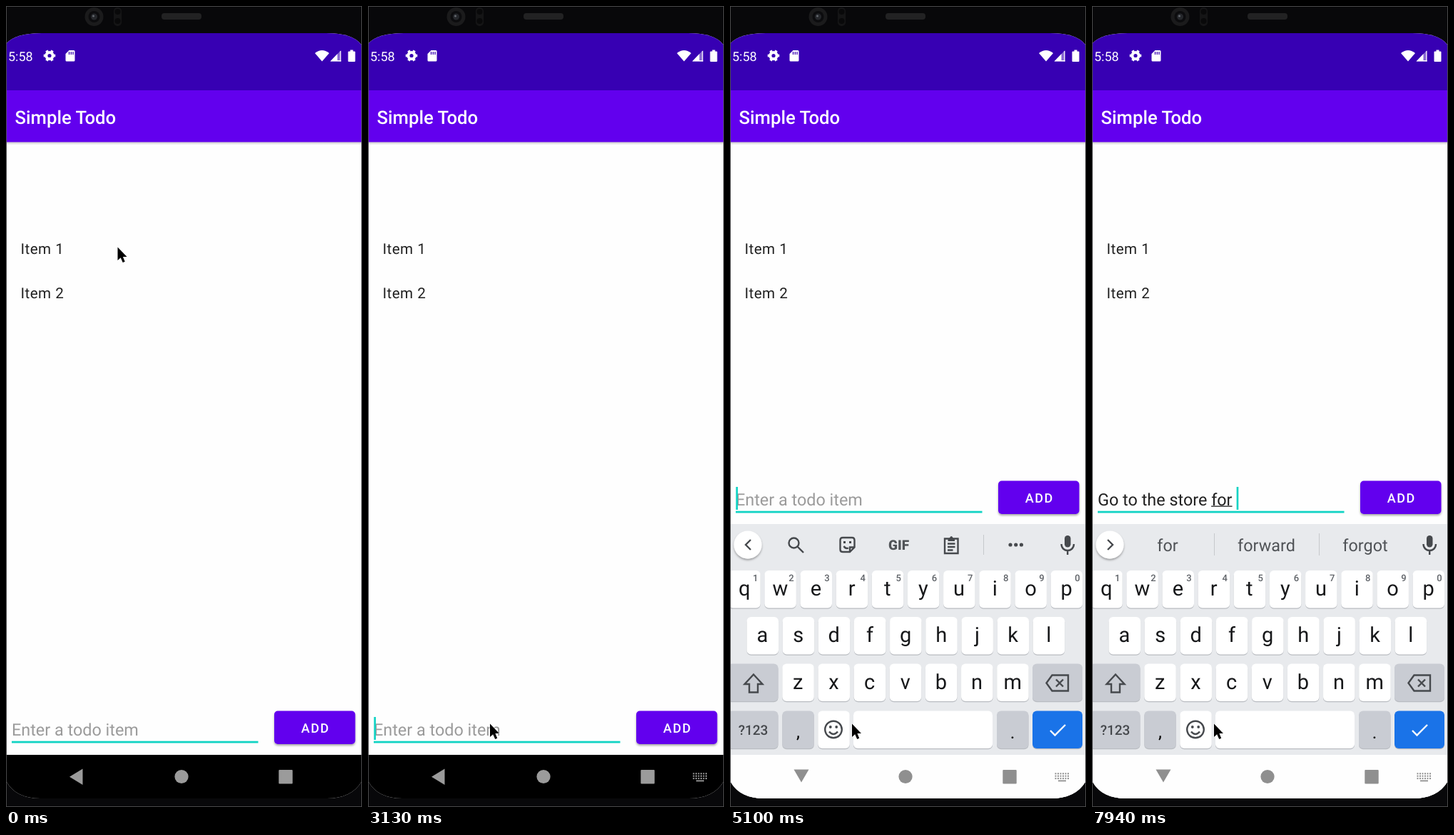
Animation of 499 by 1121 pixels, one loop 8 s. Source, as an HTML page:

```html
<!DOCTYPE html>
<html lang="en">
<head>
<meta charset="utf-8">
<title>Simple Todo</title>
<style>
html, body { margin: 0; width: 100%; height: 100%; overflow: hidden; background: #08080a; }
svg { display: block; width: 100vw; height: 100vh; font-family: Roboto, sans-serif; text-rendering: geometricPrecision; }
text { white-space: pre; }
.mid { text-anchor: middle; }
.line { fill: none; stroke: #46494d; stroke-width: 2.4; }
.hint { font-size: 23.4px; }
.item { font-size: 20.6px; letter-spacing: .45px; fill: #212121; }
.key { font-size: 29px; fill: #17181a; }
.digit { font-size: 13px; font-weight: 500; fill: #5f6368; }
.word { font-size: 23.4px; fill: #505357; }
</style>
</head>
<body>
<svg viewBox="0 0 499 1121" preserveAspectRatio="none">
  <defs>
    <clipPath id="screen"><path d="M1 52Q14 38 50 38H449Q486 38 498 54V1086Q484 1109 450 1109H48Q14 1109 1 1086Z"/></clipPath>
    <linearGradient id="shade" x2="0" y2="1"><stop stop-color="#000" stop-opacity=".2"/><stop offset="1" stop-color="#000" stop-opacity="0"/></linearGradient>
    <filter id="lift" x="-20%" y="-20%" width="140%" height="150%"><feDropShadow dx="0" dy="2" stdDeviation="1.5" flood-opacity=".35"/></filter>
  </defs>

  <!-- phone body -->
  <rect width="499" height="1121" fill="#08080a"/>
  <circle cx="123.500" cy="15" r="13" fill="#1b1b1c"/>
  <circle cx="123.500" cy="15" r="8" fill="#0c0c0e"/>
  <circle cx="123.500" cy="15" r="4.500" fill="#25272b"/>
  <circle cx="122.500" cy="14" r="1.500" fill="#666a70"/>
  <rect x="151" y="2" width="11" height="26" rx="5" fill="#151516"/>
  <circle cx="156.500" cy="8" r="4" fill="#09090a"/>
  <circle cx="156.500" cy="21" r="4" fill="#09090a"/>
  <rect x="218" y="10" width="56" height="9" rx="4" fill="#222223"/>

  <g clip-path="url(#screen)">
    <rect y="38" width="499" height="1071" fill="#fefefe"/>
    <rect y="38" width="499" height="80" fill="#3700b3"/>
    <rect y="118" width="499" height="72.500" fill="#6200ee"/>
    <rect y="190.500" width="499" height="4" fill="url(#shade)"/>
    <g fill="#fff">
      <text x="3" y="77" font-size="18">5:58</text>
      <circle cx="61" cy="69.500" r="4.600" fill="none" stroke="#fff" stroke-width="4"/>
      <circle cx="61" cy="69.500" r="6.900" fill="none" stroke="#fff" stroke-width="2.800" pathLength="12" stroke-dasharray="1 1" stroke-dashoffset=".5"/>
      <path d="M88.500 62H95Q96.500 62 96.500 63.500V76Q96.500 77.500 95 77.500H85Q83.500 77.500 83.500 76V67Z"/>
      <path d="M88.500 64V68M91.300 64V68M94 64V68" stroke="#3700b3" stroke-width="1.300"/>
      <path d="M433 66Q443 58 453 66L443 77.500Z"/>
      <path d="M454.500 77.500L469.500 62V77.500Z" fill-opacity=".4"/>
      <path d="M454.500 77.500L464.500 67V77.500ZM464 76H469.500V77.500H464Z"/>
      <path d="M468.800 63V77.500" stroke="#fff" stroke-width="1.200"/>
      <path d="M482.500 61.500H486.500V63.500H488.500Q489.500 63.500 489.500 64.500V77Q489.500 78 488.500 78H480.500Q479.500 78 479.500 77V64.500Q479.500 63.500 480.500 63.500H482.500Z"/>
      <text x="12.500" y="165" font-size="25.700" font-weight="500">Simple Todo</text>
    </g>
    <text class="item" x="20.500" y="346.500">Item 1</text>
    <text class="item" x="20.500" y="408.500">Item 2</text>

    <g id="entry">
      <text id="field" class="hint" x="8" y="1020.500"></text>
      <rect id="under" y="1021.500" height="1.300" fill="#212121"/>
      <rect x="8" y="1028.700" width="345.500" height="2.800" fill="#12d3c4"/>
      <rect id="caret" y="995" width="2.700" height="32" fill="#12d3c4"/>
      <rect x="376" y="986.500" width="113.500" height="46.500" rx="5" fill="#6200ee" filter="url(#lift)"/>
      <text class="mid" x="433.800" y="1016.700" font-size="18" font-weight="500" letter-spacing="1.600" fill="#fff">ADD</text>
    </g>

    <g id="board">
      <rect y="725" width="499" height="400" fill="#e8eaed"/>
      <circle cx="25" cy="754" r="19.500" fill="#fff" filter="url(#lift)"/>
      <path id="chevron" class="line"/>
      <g id="tools">
        <circle class="line" cx="89.500" cy="751.500" r="7"/>
        <path class="line" stroke-width="3" d="M94.500 756.500L103 765"/>
        <path class="line" d="M168 764H158Q154.500 764 154.500 760.500V747.500Q154.500 744 158 744H171Q174.500 744 174.500 747.500V757.500ZM168 764V757.500H174.500M159.500 756Q162 760 166 758.500"/>
        <path d="M159 749H162V752H159ZM167 749H170V752H167Z" fill="#46494d"/>
        <text class="mid" x="236.500" y="760.500" font-size="19" font-weight="900" fill="#505357">GIF</text>
        <path class="line" d="M301 745.500H319.500V766H301ZM305 752.500H315.500M305 757H315.500M305 761.500H312.500"/>
        <path d="M305.500 745H307.500Q310.200 739 313 745H315V749H305.500Z" fill="#46494d"/>
        <path d="M355.500 740V768" stroke="#c6c9cc"/>
        <g fill="#46494d"><circle cx="393" cy="754" r="2.600"/><circle cx="400.700" cy="754" r="2.600"/><circle cx="408.400" cy="754" r="2.600"/></g>
      </g>
      <g id="words">
        <path d="M171.500 738V769M318.500 738V769" stroke="#c6c9cc"/>
        <text class="word mid" x="106" y="763"></text>
        <text class="word mid" x="244.500" y="763"></text>
        <text class="word mid" x="383" y="763"></text>
      </g>
      <rect x="469" y="741" width="8.500" height="16.500" rx="4.200" fill="#46494d"/>
      <path class="line" d="M464.500 753C464.500 765 482 765 482 753M473.200 762V768"/>
      <g id="keys"></g>
      <path class="line" d="M33 935.500L45.500 949H39V960.500H27V949H20.500Z"/>
      <path class="line" d="M443.500 947.500L451.500 936.500H474V958.500H451.500ZM457 942.500L467 952.500M467 942.500L457 952.500"/>
      <text class="mid" x="32.500" y="1020" font-size="19" font-weight="500" fill="#46494d">?123</text>
      <text class="mid" x="95.500" y="1024" font-size="25">,</text>
      <text class="mid" x="396" y="1025" font-size="25">.</text>
      <circle class="line" cx="145" cy="1012.500" r="11.800"/>
      <path class="line" d="M139 1015.500Q145 1022.500 151 1015.500"/>
      <g fill="#46494d"><circle cx="140.800" cy="1009" r="1.900"/><circle cx="149.200" cy="1009" r="1.900"/></g>
      <path d="M449 1014L455.500 1020.500L470 1006" fill="none" stroke="#fff" stroke-width="2.400"/>
    </g>

    <rect id="nav" y="1048" width="499" height="61"/>
    <g id="buttons">
      <path id="back"/>
      <circle cx="246" cy="1078.500" r="9.600"/>
      <rect x="382.300" y="1069" width="19.400" height="19.400" rx="1"/>
      <g id="switch"></g>
    </g>
  </g>
  <rect x=".5" y=".5" width="498" height="1120" fill="none" stroke="#666" stroke-opacity=".7"/>
  <path id="mouse" d="M0 0V18.500L4.200 14.800L7.200 21.500L10.200 20.200L7.400 13.600H13Z" stroke="#fff" stroke-width="1" paint-order="stroke"/>
</svg>
<script>
const $ = id => document.getElementById(id);
const set = (el, attrs) => { for (const k in attrs) el.setAttribute(k, attrs[k]); };
const show = (el, on) => { el.style.display = on ? '' : 'none'; };
const LOOP = 8000, LEFT = 8, PITCH = 50.15;

// keyboard
let keys = '';
const addKey = (x, y, w, fill = '#fff') => {
  keys += `<rect x="${x}" y="${y + 1.3}" width="${w}" height="52.5" rx="6" fill="#b9bcc1"/>
    <rect x="${x}" y="${y}" width="${w}" height="52.5" rx="6" fill="${fill}"/>`;
};
[['qwertyuiop', 20.2, 790], ['asdfghjkl', 45.5, 855], ['zxcvbnm', 95.3, 920.5]].forEach(([row, x0, y], r) =>
  [...row].forEach((ch, i) => {
    const x = x0 + i * PITCH;
    addKey(x - 22, y, 44.5);
    keys += `<text class="key mid" x="${x}" y="${y + 35.3}">${ch}</text>`;
    if (!r) keys += `<text class="digit mid" x="${x + 15.5}" y="${y + 14.5}">${(i + 1) % 10}</text>`;
  }));
const GREY = '#c9ccd3';
addKey(-3, 920.5, 70.5, GREY);
addKey(424, 920.5, 70, GREY);
addKey(-3, 986.5, 70.5, GREY);
addKey(73.3, 986.5, 44.5, GREY);
addKey(123.3, 986.5, 44.5);
addKey(173, 986.5, 195);
addKey(374, 986.5, 44.5, GREY);
addKey(424, 986.5, 70, '#1a73e8');
$('keys').innerHTML = keys;

let dots = '';
for (let y = 0; y < 3; y++)
  for (let x = 0; x < 6; x++) dots += `<rect x="${455.5 + x * 3.5}" y="${1073.3 + y * 3.4}" width="2" height="2"/>`;
$('switch').innerHTML = dots + '<rect x="460" y="1083.5" width="11" height="1.800"/>';

// time, text, suggestions, word no longer underlined
const typing = [
  [5240, 'G', 'G|Go|Good'],
  [5370, 'Go', 'Go|Good|Going'],
  [5510, 'Go ', 'Go|Good|Going'],
  [5650, 'Go ', 'to|for|and', true],
  [5780, 'Go t', 't|to|the'],
  [5920, 'Go to', 'to|tomorrow|today'],
  [6050, 'Go to ', 'to|tomorrow|today'],
  [6190, 'Go to t', 'the|a|my'],
  [6320, 'Go to th', 'th|the|that'],
  [6450, 'Go to the', 'the|them|they'],
  [6590, 'Go to the ', 'the|them|they'],
  [6720, 'Go to the s', 's|store|same'],
  [6860, 'Go to the st', 'st|store|still'],
  [6990, 'Go to the stor', 'stor|store|story'],
  [7120, 'Go to the store ', 'stor|store|story'],
  [7250, 'Go to the store ', 'store|stores|stories', true],
  [7390, 'Go to the store ', 'to|and|for', true],
  [7680, 'Go to the store f', 'f|for|from'],
  [7810, 'Go to the store fo', 'fo|for|food'],
  [7940, 'Go to the store for ', 'for|forward|forgot']
];
const blinks = [130, 670, 1110, 1640, 2190, 2640, 3130, 3650, 4090, 4600, 5100];
const pen = document.createElement('canvas').getContext('2d');
pen.font = '23.4px Roboto, sans-serif';
const width = s => pen.measureText(s).width;

// eased progress in held steps
const glide = (t, start, step, n) => {
  const p = Math.min(Math.max(Math.floor((t - start) / step) / n, 0), 1);
  return p * p * (3 - 2 * p);
};

function draw(t) {
  const [, text, words, plain] = typing.findLast(s => t >= s[0]) || [0, '', ''];
  const open = t >= 3280;

  const travel = glide(t, 1110, 134, 7), settle = glide(t, 2050, 140, 3);
  const x = 156.5 + (t >= 130) * .5 + (t >= 270) * .5 + travel * 13.5;
  set($('mouse'), { transform: `translate(${x} ${337.5 + travel * 656 + settle * 11})` });

  set($('entry'), { transform: `translate(0 ${open ? -322 : 0})` });
  $('field').textContent = text || 'Enter a todo item';
  set($('field'), { fill: text ? '#212121' : '#9b9b9b' });
  const word = text && !plain ? text.match(/\S+(?= ?$)/) : null;
  show($('under'), word);
  if (word) set($('under'), { x: LEFT + width(text.slice(0, word.index)), width: width(word[0]) });
  show($('caret'), blinks.filter(b => t >= b).length % 2);
  set($('caret'), { x: LEFT + .3 + width(text) });

  show($('board'), open);
  set($('board'), { transform: `translate(0 ${t < 3400 ? 120 : 0})` });
  show($('tools'), !text);
  show($('words'), text);
  set($('chevron'), { d: text ? 'M22 747L29 754L22 761' : 'M29 747L22 754L29 761' });
  const labels = words.split('|');
  $('words').querySelectorAll('text').forEach((el, i) => { el.textContent = labels[i] || ''; });

  set($('nav'), { fill: open ? '#fefefe' : '#000' });
  set($('buttons'), { fill: open ? '#8f8f8f' : '#9b9b9b' });
  set($('back'), { d: open ? 'M89.500 1068.500H110.500L100 1086.500Z' : 'M107.500 1067.500V1090L89 1078.700Z' });
  show($('switch'), t >= 3130);
}

const begin = performance.now();
(function tick() {
  draw((performance.now() - begin) % LOOP);
  requestAnimationFrame(tick);
})();
</script>
</body>
</html>
```
